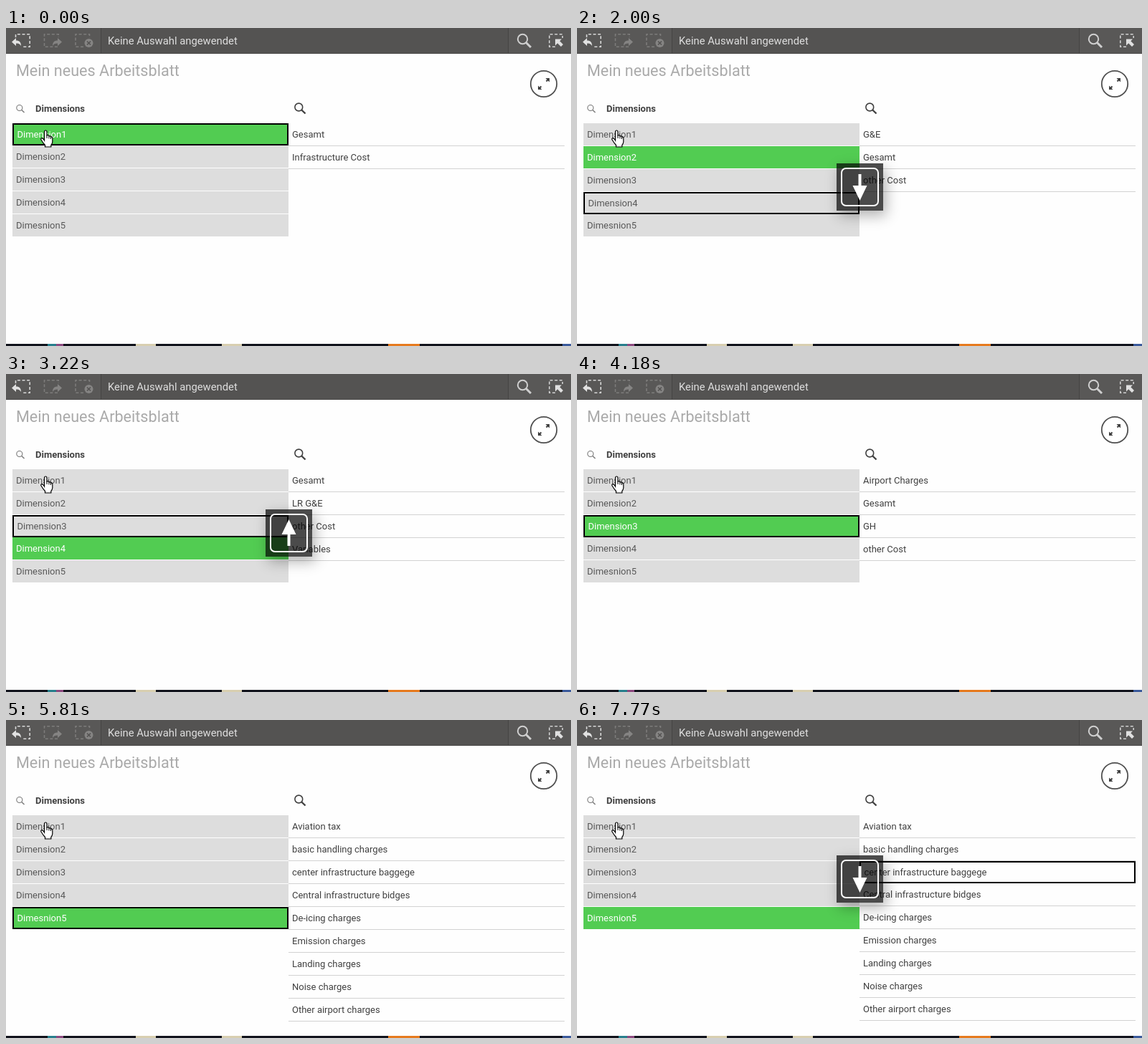
These frames come from a looping animation (788 by 444 pixels, 8 s). An HTML page:

```html
<!DOCTYPE html>
<html lang="de">
<head>
<meta charset="utf-8">
<style>
html, body { margin: 0; width: 100%; height: 100%; overflow: hidden; background: #fefefe; }
body { position: relative; font: 13px Roboto, sans-serif; color: #404040; }
svg { display: block; }
#stage, #cursor { position: absolute; left: 0; top: 0; }
.list { position: absolute; top: 133px; width: 385px; }
.row { height: 31px; line-height: 31px; padding-left: 5px; border-bottom: 1px solid #d2d2d2; white-space: nowrap; }
#left { left: 9px; }
#right { left: 394px; }
#left .row { background: #ddd; color: #595959; border-color: #fefefe; }
#left .sel { background: #52cc52; color: #fff; }
.list .focus { border: 0; padding-left: 6.5px; box-shadow: inset 0 0 0 2px #000; }
#keys { position: absolute; top: 189px; left: 0; width: 789px; display: flex; justify-content: center; }
#box { display: flex; align-items: center; padding: 6px; height: 54px; background: rgba(0,0,0,.7);
  box-shadow: 4px 7px 18px rgba(0,0,0,.3); color: #fff; font: 32px/50px "Open Sans", sans-serif; }
.cap { box-sizing: border-box; height: 54px; min-width: 53px; padding: 0 8.5px; border: 2px solid #fff; border-radius: 7px; }
.cap svg { margin: 0 -8.5px; }
.plus { margin: 0 20px; }
</style>
</head>
<body>
<svg id="stage" width="788" height="444" font-family="Roboto, sans-serif">
  <rect width="788" height="36" fill="#545352"/>
  <rect width="132" height="36" fill="#595857"/>
  <rect x="701" width="87" height="36" fill="#595857"/>
  <path d="M132.5 0V36M700.5 0V36" stroke="#454443"/>
  <path d="M0 35.5H788" stroke="#4a4948"/>
  <g fill="none" stroke-width="1.6" stroke-dasharray="4 2.6">
    <path d="M13.5 13V8.8H33.2V26.2H23" stroke="#d8d8d8"/>
    <path d="M72 26.2H53.5V8.8H73.2V13" stroke="#7d7c7b"/>
    <path d="M108 26.2H97V8.8H116.5V14" stroke="#7d7c7b"/>
    <path d="M766 26.2H757.8V8.8H776.2V14" stroke="#d0d0d0"/>
  </g>
  <path id="step" d="M8 19.5L14 14V17.5C19 17.5 21 20 21 25C19 22 17.500 21.500 14 21.500V25Z" fill="#e2e2e2"/>
  <path d="M78 19.500L72 14V17.500C67 17.500 65 20 65 25C67 22 68.500 21.500 72 21.500V25Z" fill="#858483"/>
  <circle cx="115.500" cy="21" r="6" fill="#858483"/>
  <path d="M113 18.500L118 23.500M118 18.500L113 23.500" stroke="#545352" stroke-width="1.600"/>
  <path d="M766 15.500H775L772.300 18.200L777 23L774 26L769.200 21.200L766 24.500Z" fill="#e0e0e0"/>
  <g fill="none">
    <circle cx="720.500" cy="15.500" r="6.700" stroke="#cfcfcf" stroke-width="2"/>
    <path d="M725.500 20.500L732 27" stroke="#cfcfcf" stroke-width="3"/>
    <circle cx="18.800" cy="111.500" r="4" stroke="#777" stroke-width="1.100"/>
    <path d="M21.800 114.500L25.500 118" stroke="#777" stroke-width="1.400"/>
    <circle cx="408.300" cy="110.500" r="5.400" stroke="#404040" stroke-width="1.600"/>
    <path d="M412.300 114.500L417.500 119.500" stroke="#404040" stroke-width="2.400"/>
    <circle cx="750" cy="78" r="18.200" fill="#fff" stroke="#505050" stroke-width="1.800"/>
    <path d="M753.500 74.500L756 72M746.500 81.500L744 84" stroke="#404040" stroke-width="2"/>
  </g>
  <path d="M752.500 70H758V75.500ZM742 80.500V86H747.500Z" fill="#404040"/>
  <text x="142" y="23" font-size="14.8" fill="#dedede">Keine Auswahl angewendet</text>
  <text x="14" y="67" font-size="21.6" fill="#aaa">Mein neues Arbeitsblatt</text>
  <text x="41" y="117" font-size="13" font-weight="700" fill="#404040">Dimensions</text>
  <rect y="441" width="788" height="3" fill="#11131c"/>
  <path d="M58 442.500H70" stroke="#277f8c" stroke-width="3"/>
  <path d="M70 442.500H80" stroke="#8d4a80" stroke-width="3"/>
  <path d="M181 442.500H209M301 442.500H329" stroke="#d8cfb0" stroke-width="3"/>
  <path d="M533 442.500H577" stroke="#e67a1e" stroke-width="3"/>
  <path d="M776 442.500H788" stroke="#3a5a9c" stroke-width="3"/>
</svg>
<div id="left" class="list"></div>
<div id="right" class="list"></div>
<svg id="cursor" width="80" height="175">
  <path d="M53.500 157V145Q53.500 143 55.200 143Q57 143 57 145V150Q59.500 149 60 151Q62 150.200 62.500 152Q64.800 151.600 64.800 154V159Q64.500 162 62.800 163.500V166H54.500V163.500Q52 161 49 156Q48.200 154 50 153.600Q51.500 153.600 53.500 157Z" fill="#fff" stroke="#000" stroke-width="1.200"/>
  <path d="M57 150V154M60 151V154.500M62.500 152V155" stroke="#000"/>
</svg>
<div id="keys"></div>
<script>
const LOOP = 8000;
const dims = ['Dimension1', 'Dimension2', 'Dimension3', 'Dimension4', 'Dimesnion5'];
const values = [
  ['Gesamt', 'Infrastructure Cost'],
  ['G&amp;E', 'Gesamt', 'other Cost'],
  ['Airport Charges', 'Gesamt', 'GH', 'other Cost'],
  ['Gesamt', 'LR G&amp;E', 'other Cost', 'Variables'],
  ['Aviation tax', 'basic handling charges', 'center infrastructure baggege',
   'Central infrastructure bidges', 'De-icing charges', 'Emission charges',
   'Landing charges', 'Noise charges', 'Other airport charges']
];
const turn = { Down: 0, Up: 180, Right: -90 };

// Each step changes part of the state: sel(ected) row, shown list, focus on the left or right, keys pressed
const steps = [
  [0, { sel: 0, list: 0, left: 0, right: -1, keys: '' }],
  [290, { left: 1, keys: 'Down' }],
  [1000, { sel: 1, list: 1, keys: 'Space' }],
  [1550, { left: 2, keys: 'Down' }],
  [2000, { left: 3 }],
  [2370, { sel: 3, keys: 'Space' }],
  [2510, { list: 3 }],
  [3110, { left: 2, keys: 'Up' }],
  [3550, { sel: 2, keys: 'Space' }],
  [3620, { list: 2 }],
  [4180, { keys: '' }],
  [4440, { left: 3, keys: 'Down' }],
  [4810, { left: 4 }],
  [5140, { sel: 4, keys: 'Space' }],
  [5180, { list: 4 }],
  [5810, { keys: '' }],
  [6660, { left: -1, right: 1, keys: 'Ctrl+Shift+Right' }],
  [7700, { right: 2, keys: 'Down' }]
];

const $ = id => document.getElementById(id);

const rows = (items, focus, sel) => items.map((text, i) =>
  `<div class="row${i === focus ? ' focus' : ''}${i === sel ? ' sel' : ''}">${text}</div>`).join('');

const arrow = key => `<svg width="49" height="50"><path transform="rotate(${turn[key]} 24.5 25)"
  d="M22.500 7H26.500V23H34.500L24.500 44L14.500 23H22.500Z" fill="#fff"/></svg>`;

const cap = key => `<div class="cap">${key in turn ? arrow(key) : key}</div>`;

function draw(s) {
  $('left').innerHTML = rows(dims, s.left, s.sel);
  $('right').innerHTML = rows(values[s.list], s.right);
  $('keys').innerHTML = s.keys &&
    `<div id="box">${s.keys.split('+').map(cap).join('<span class="plus">+</span>')}</div>`;
}

let shown = 0;
function frame() {
  const t = performance.now() % LOOP;
  const past = steps.filter(([at]) => at <= t);
  if (past.length !== shown) {
    shown = past.length;
    draw(Object.assign({}, ...past.map(([, change]) => change)));
  }
  requestAnimationFrame(frame);
}
frame();
</script>
</body>
</html>
```
